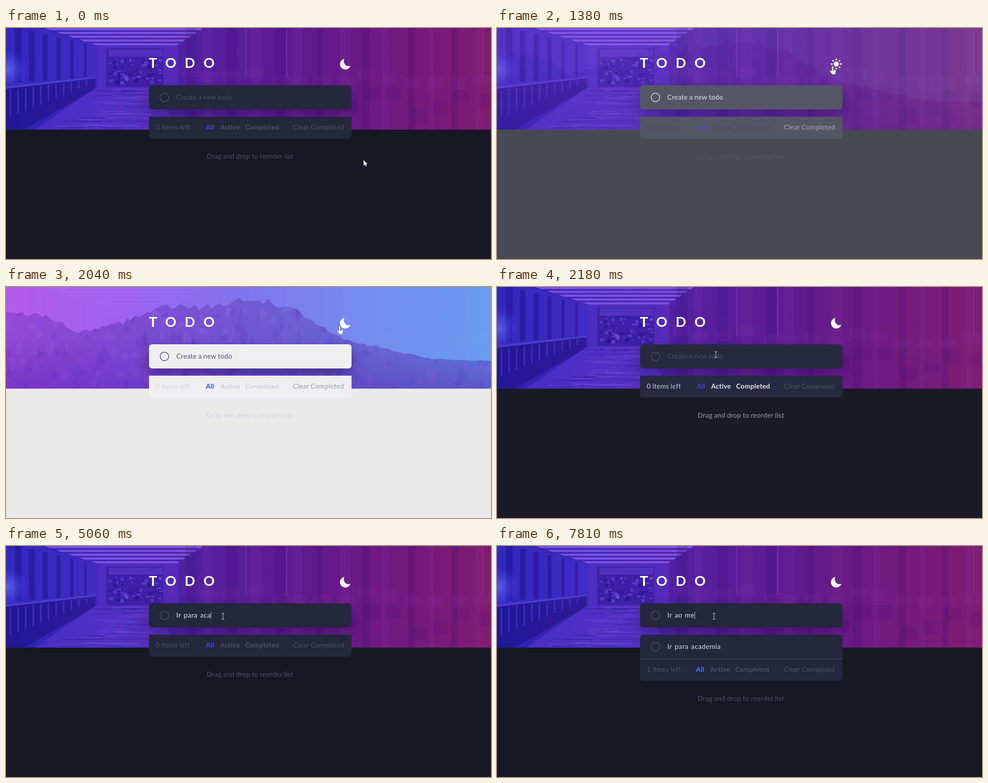
Animation, 1085 px wide and 516 px high, one loop 8 s. Source, as an HTML page with a canvas:

```html
<!DOCTYPE html>
<html lang="en">
<head>
<meta charset="utf-8">
<title>Todo</title>
<style>
html, body { margin: 0; width: 1085px; height: 516px; overflow: hidden; background: #171823; }
canvas { display: block; }
</style>
</head>
<body>
<canvas id="stage" width="1085" height="516"></canvas>
<script>
const W = 1085, H = 516, HERO = 227, LOOP = 8000;
const TO_LIGHT = 1306, TO_DARK = 1986, FADE = 215, FOCUS = 2550, ENTER = 5860;
const TICK = 72.7, SETTLED = 2770;
const FONT = 'Lato, "Open Sans", sans-serif';
const ctx = document.getElementById('stage').getContext('2d');

const DARK = { dim: '#4d5066', entry: '#e4e5f1', clear: '#a5a6b5', count: '#c8cbe7',
  filter: '#e4e5f1', hint: '#9c9dac' };
const LIGHT = { dim: '#d0d1d9', entry: '#484b7a', clear: '#9a9bad', count: '#484b6a',
  filter: '#3c3c70', hint: '#9394a9' };

const clamp = x => Math.min(1, Math.max(0, x));
const smooth = x => (x = clamp(x), x * x * x * (x * (6 * x - 15) + 10));
const lerp = (a, b, p) => a + (b - a) * p;
const rgb = hex => [1, 3, 5].map(i => parseInt(hex.slice(i, i + 2), 16));
const mix = (a, b, p) => {
  const to = rgb(b);
  return `rgb(${rgb(a).map((v, i) => Math.round(lerp(v, to[i], p)))})`;
};

// Typing in bursts, each with a start, its letters and a pace.
const burst = (start, letters, pace = 0) => [...letters].map((char, i) => ({ char, at: start + i * pace }));
const FIRST = [...burst(3280, 'I'), ...burst(3860, 'r ', 210), ...burst(4350, 'para aca', 101), ...burst(5210, 'demia', 125)];
const SECOND = [...burst(6860, 'I'), ...burst(7170, 'r ', 130), ...burst(7460, 'ao me', 87)];
const word = keys => keys.map(k => k.char).join('');

function random(seed) {
  return () => (seed = seed * 16807 % 2147483647) / 2147483647;
}

function fade(c, colors, vertical) {
  const g = c.createLinearGradient(0, 0, vertical ? 0 : W, vertical ? HERO : 0);
  colors.forEach((color, i) => g.addColorStop(i / (colors.length - 1), color));
  return g;
}

function poly(c, color, ...pts) {
  c.fillStyle = color;
  c.beginPath();
  for (let i = 0; i < pts.length; i += 2) c.lineTo(pts[i], pts[i + 1]);
  c.fill();
}

function rect(c, color, x, y, w, h) {
  c.fillStyle = color;
  c.fillRect(x, y, w, h);
}

function scene(paint) {
  const canvas = document.createElement('canvas');
  canvas.width = W;
  canvas.height = HERO;
  paint(canvas.getContext('2d'));
  return canvas;
}

const night = scene(c => {
  const rnd = random(41);
  rect(c, fade(c, ['#2c20b0', '#4226b6', '#5420a0', '#5f1a90', '#701a80', '#801c72']), 0, 0, W, HERO);
  // ceiling lights
  for (let i = 0; i < 5; i++) {
    const y = i * 8.5, l = 85 + i * 26, r = 440 - i * 13;
    poly(c, 'rgba(140,100,245,.7)', l, y, r, y, r - 5, y + 5, l + 14, y + 5);
  }
  // left wall, railing and floor, narrowing toward the doorway
  poly(c, 'rgba(70,60,225,.25)', 0, 0, 75, 0, 205, 42, 205, 118, 0, 132);
  for (let i = 0; i < 6; i++) rect(c, 'rgba(22,10,120,.38)', 20 + i * 31, i * 7, 15 - i * 2, 122 - i * 9);
  poly(c, 'rgba(20,8,110,.4)', 0, 135, 200, 112, 200, 136, 40, HERO, 0, HERO);
  poly(c, 'rgba(100,85,230,.5)', 0, 131, 200, 109, 200, 112, 0, 136);
  for (let i = 0; i < 11; i++) rect(c, 'rgba(85,70,215,.4)', 8 + i * 17, 137 - i * 2, 4, 62 - i * 5);
  poly(c, 'rgba(100,65,220,.4)', 200, 134, 330, 134, 385, HERO, 65, HERO);
  for (let i = 0; i < 40; i++) {
    const y = 136 + rnd() * 88, l = 330 - y;
    rect(c, i % 2 ? 'rgba(40,18,140,.25)' : 'rgba(125,95,235,.25)', l + rnd() * 120, y, 30 + rnd() * 70, 2.5);
  }
  const glow = c.createRadialGradient(4, 92, 0, 4, 92, 45);
  glow.addColorStop(0, 'rgba(110,115,255,.7)');
  glow.addColorStop(1, 'rgba(80,80,255,0)');
  rect(c, glow, 0, 40, 60, 100);
  // doorway
  rect(c, 'rgba(95,60,215,.35)', 205, 38, 180, 96);
  rect(c, 'rgba(35,15,135,.4)', 224, 46, 128, 86);
  rect(c, 'rgba(110,75,225,.4)', 230, 48, 120, 16);
  for (let i = 0; i < 70; i++)
    rect(c, i % 2 ? 'rgba(25,10,115,.35)' : 'rgba(125,100,240,.4)', 228 + rnd() * 115, 68 + rnd() * 52, 3 + rnd() * 8, 2 + rnd() * 6);
  // stone columns
  for (let i = 0; i < 14; i++) {
    const x = 390 + i * 50 + rnd() * 15, w = 10 + rnd() * 20;
    rect(c, i % 2 ? 'rgba(145,60,175,.14)' : 'rgba(50,8,105,.18)', x, 0, w, HERO);
    rect(c, 'rgba(150,60,175,.1)', x - 8, 85 + rnd() * 30, 40, 24);
    rect(c, 'rgba(50,8,105,.1)', x + 6, 130 + rnd() * 50, 36, 30);
  }
  for (const x of [535, 627, 1065]) rect(c, 'rgba(185,85,205,.3)', x, 0, 2, 110);
});

const day = scene(c => {
  const rnd = random(77);
  rect(c, fade(c, ['#c060f0', '#a468f4', '#837cf5', '#7696f8', '#68a6fa']), 0, 0, W, HERO);
  // ridge: a few summits with jagged rock between them
  const peaks = [[0, 60], [93, 60], [160, 102], [255, 80], [345, 45], [470, 42], [550, 24],
    [640, 44], [745, 112], [850, 138], [950, 160], [W, 166]];
  const ridge = [0, HERO];
  for (let x = 0, i = 0; x <= W; x += 9) {
    while (x > peaks[i + 1][0]) i++;
    const [[x0, y0], [x1, y1]] = peaks.slice(i, i + 2);
    const y = lerp(y0, y1, (x - x0) / (x1 - x0));
    ridge.push(x, y + (rnd() - .4) * (190 - y) * .1);
  }
  poly(c, fade(c, ['#a34fdc', '#8652d8', '#7461dc', '#6c78e2', '#5c94ee']), ...ridge, W, 166, W, HERO);
  c.save();
  c.clip();
  for (let i = 0; i < 240; i++) {
    const x = rnd() * W, y = 35 + rnd() * 185, h = 12 + rnd() * 34, w = 4 + rnd() * 13;
    poly(c, i % 2 ? 'rgba(65,35,170,.13)' : 'rgba(190,150,255,.13)',
      x, y, x + w, y + h * .6, x + w * .3 - 4, y + h, x - w * .6, y + h * .7);
  }
  rect(c, fade(c, ['rgba(85,30,180,0)', 'rgba(85,30,180,.1)', 'rgba(85,30,180,.45)'], true), 0, 0, W, HERO);
  c.restore();
});

function text(str, x, y, color, weight = 400, size = 15, spacing = .3, gap = -.5) {
  ctx.font = `${weight} ${size}px ${FONT}`;
  ctx.letterSpacing = spacing + 'px';
  ctx.wordSpacing = gap + 'px';
  ctx.fillStyle = color;
  ctx.fillText(str, x, y);
  return ctx.measureText(str).width;
}
const entryText = (str, y, color) => text(str, 381, y, color, 500, 15.3, .4, 1.5);

function box(y, h, radii, color) {
  ctx.fillStyle = color;
  ctx.beginPath();
  ctx.roundRect(320, y, 453, h, radii);
  ctx.fill();
}

function ring(y, color) {
  ctx.strokeStyle = color;
  ctx.lineWidth = 1.5;
  ctx.beginPath();
  ctx.arc(354.5, y, 9.6, 0, 7);
  ctx.stroke();
}

const MOON = new Path2D('M757 69A12 12 0 1 0 770.5 84.5A11 11 0 0 1 757 69Z');
function icon(sun) {
  ctx.fillStyle = ctx.strokeStyle = '#fff';
  if (!sun) return ctx.fill(MOON);
  ctx.lineWidth = 2.9;
  ctx.beginPath();
  ctx.arc(759, 80.5, 5.7, 0, 7);
  ctx.fill();
  ctx.beginPath();
  for (let i = 0; i < 8; i++) {
    const x = Math.cos(i * Math.PI / 4), y = Math.sin(i * Math.PI / 4);
    ctx.moveTo(759 + x * 8.4, 80.5 + y * 8.4);
    ctx.lineTo(759 + x * 12, 80.5 + y * 12);
  }
  ctx.stroke();
}

const POINTERS = {
  arrow: new Path2D('M0 0V12.5L3 9.8L5 14L7 13L5.2 9H8.8Z'),
  hand: new Path2D('M5 1.5Q6.5 0 8 1.5V7L12.5 8.3Q14.3 9 14 12L12.5 18.5H6L1 12Q.5 9.5 3 10.5L5 12Z'),
  beam: new Path2D('M-3 -6.5H3M0 -6.5V6.5M-3 6.5H3')
};
function pointer(kind, x, y) {
  ctx.save();
  ctx.translate(x, y);
  ctx.lineWidth = 1;
  ctx.fillStyle = '#fff';
  ctx.strokeStyle = kind === 'beam' ? '#d8d8e0' : '#222';
  ctx.stroke(POINTERS[kind]);
  if (kind !== 'beam') ctx.fill(POINTERS[kind]);
  if (kind === 'hand') ctx.stroke(new Path2D('M8 7V11M10.3 8V11'));
  ctx.restore();
}

function drawPointer(t) {
  const glide = (kind, start, span, x0, y0, x1, y1) => {
    const p = smooth((t - start) / span);
    pointer(kind, lerp(x0, x1, p), lerp(y0, y1, p));
  };
  if (t < 1140) glide('arrow', 340, 640, 800, 295, 745, 86);
  else if (t < 1600) glide('hand', 1160, 140, 740, 75, 744, 85);
  else if (t < 2100) glide('hand', 1600, 400, 744, 85, 740, 87);
  else if (t < 2170) pointer('arrow', 620, 120);
  else glide('beam', 2180, 400, 489.5, 151, 485.5, 157);
}

function drawEntry(t, color) {
  const typed = word((t < ENTER ? FIRST : SECOND).filter(k => k.at <= t));
  let width = 0;
  if (typed) width = entryText(typed, 159.5, '#d0d3ec');
  else text('Create a new todo', 381, 159.5, color);
  const pressed = [FOCUS, ...[...FIRST, ...SECOND].map(k => k.at)].filter(at => at <= t).pop();
  if (pressed && Math.floor((t - pressed) / 500) % 2 === 0)
    rect(ctx, '#d0d3ec', Math.round(381 + width), 147, 1, 16);
}

function draw(time) {
  // Pointer and theme move in even ticks; the opening pose holds until the first move.
  const snapped = TO_LIGHT + Math.floor((time - TO_LIGHT) / TICK) * TICK;
  const t = time < SETTLED ? (snapped < 430 ? 0 : snapped) : time;
  const isLight = t >= TO_LIGHT && t < TO_DARK;
  const [from, to] = isLight ? [DARK, LIGHT] : [LIGHT, DARK];
  const since = isLight ? t - TO_LIGHT : t < TO_LIGHT ? LOOP : t - TO_DARK;
  const p = smooth(since / FADE), light = isLight ? p : 1 - p;

  // Entry and button flash the old ink first; labels flash the new ink afterwards.
  const swap = smooth((since - 50) / 130);
  const early = name => mix(from[name], to.dim, swap);
  const late = name => since < 300
    ? mix(from.dim, to[name], swap)
    : mix(to[name], to.dim, smooth((since - 300) / 350));

  rect(ctx, mix('#171823', '#fafafa', light), 0, 0, W, H);
  ctx.drawImage(night, 0, 0);
  ctx.globalAlpha = light;
  ctx.drawImage(day, 0, 0);
  ctx.globalAlpha = 1;

  text('TODO', 319.5, 88.5, '#fff', 700, 31, 18.6);
  icon(isLight);

  const card = mix('#25273c', '#ffffff', light);
  ctx.save();
  ctx.beginPath();
  ctx.rect(0, 0, W, HERO);
  ctx.clip();
  ctx.shadowColor = `rgba(10,0,50,${lerp(.28, .4, light)})`;
  ctx.shadowBlur = 28;
  ctx.shadowOffsetY = 12;
  box(128, 54, 7, card);
  ctx.restore();
  ring(155, early('entry'));
  drawEntry(t, early('entry'));

  const added = t >= ENTER, dy = added ? 54 : 0, dx = added ? -2 : 0;
  box(198, 49 + dy, added ? 7 : [0, 0, 7, 7], card);
  if (added) {
    ring(225, DARK.dim);
    entryText(word(FIRST), 229.5, DARK.count);
    rect(ctx, DARK.dim, 320, 252, 453, 1);
  }
  const y = 227 + dy;
  text(`${+added} items left`, 335, y, late('count'));
  text('All', 447 + dx, y, added ? '#4a74ff' : mix('#4446e0', '#3a4be0', light), 700);
  text('Active', 479 + dx, y, late('filter'), 700);
  text('Completed', 535 + dx, y, late('filter'), 700);
  text('Clear Completed', 642, y, early('clear'));
  text('Drag and drop to reorder list', 449, 292 + dy, late('hint'));

  drawPointer(t);
}

const start = performance.now();
function loop() {
  draw((performance.now() - start) % LOOP);
  requestAnimationFrame(loop);
}
loop();
</script>
</body>
</html>
```
